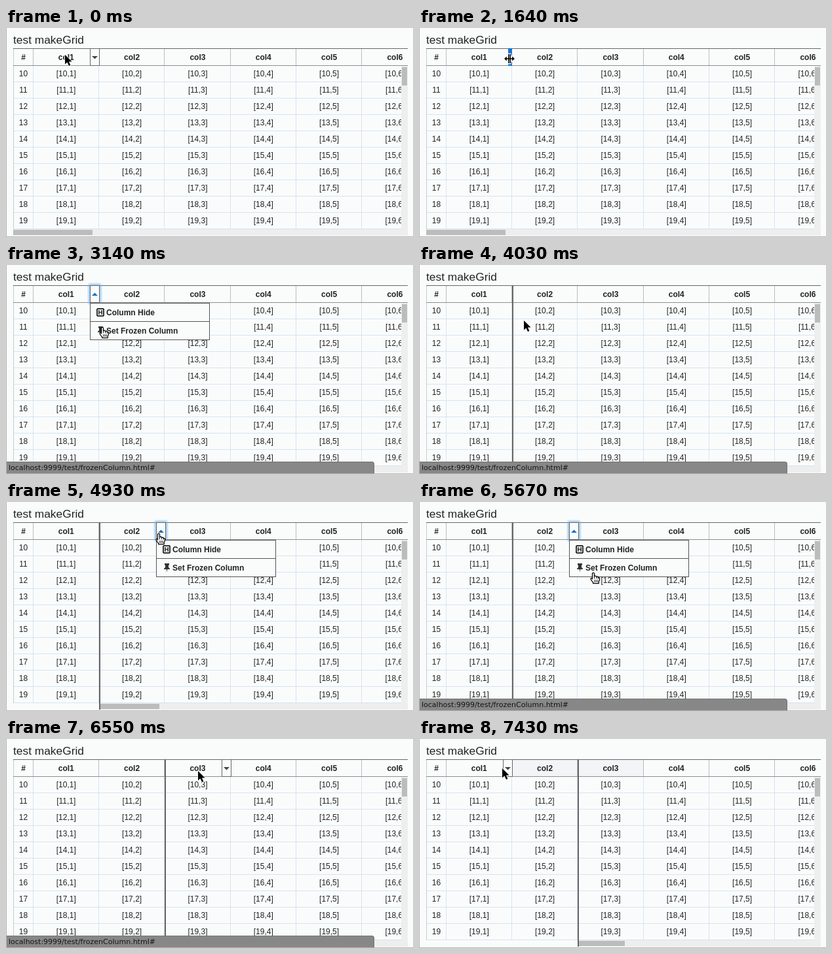
Write an HTML page that moves like this. It is 621 px wide and 320 px high and loops after 8000 ms.

```html
<!DOCTYPE html>
<html lang="en">
<head>
<meta charset="utf-8">
<title>Frozen column grid</title>
<style>
html, body { margin: 0; width: 100%; height: 100%; overflow: hidden; background: #fafcfc; }
svg { display: block; width: 621px; height: 320px; font: 12px "Liberation Sans", Arial, sans-serif; cursor: default; }
rect { shape-rendering: crispEdges; }
text { fill: #222; }
.mid { text-anchor: middle; }
.bold { font-weight: bold; }
.title { font-size: 17.35px; }
.status { font: 11px "DejaVu Sans", sans-serif; fill: #151515; }
</style>
</head>
<body>
<svg id="stage" viewBox="0 0 621 320" xmlns="http://www.w3.org/2000/svg"></svg>
<script>
const LOOP = 8000, BG = '#fafcfc', DARK = '#666';
const stage = document.getElementById('stage');

function add(parent, tag, attrs, text) {
  const el = document.createElementNS('http://www.w3.org/2000/svg', tag);
  for (const k in attrs) el.setAttribute(k, attrs[k]);
  if (text !== undefined) el.textContent = text;
  parent.appendChild(el);
  return el;
}
const group = (parent = stage) => add(parent, 'g', {});
const rect = (p, x, y, width, height, fill) => add(p, 'rect', { x, y, width, height, fill });
const label = (p, x, y, cls, s) => add(p, 'text', { x, y, class: cls }, s);
const path = (p, d, attrs) => add(p, 'path', { d, ...attrs });
const show = (el, on) => { el.style.display = on ? '' : 'none'; };
const move = (el, x, y) => el.setAttribute('transform', `translate(${x} ${y})`);

const edge = k => Math.floor(41.3 + 100.33 * k);
const center = k => 91.8 + 100.33 * (k - 1);

// Page and grid
rect(stage, 0, 0, 621, 320, BG);
rect(stage, 0, 0, 1, 320, '#b4b4b4');
rect(stage, 0, 319, 621, 1, '#b4b4b4');
label(stage, 11, 24, 'title', 'test makeGrid');

const tints = [1, 2, 3].map(k => rect(stage, edge(k - 1) + 1, 32, 100, 25, '#f3f4f6'));
for (let r = 0; r < 10; r++) {
  const y = 58 + 25 * r;
  rect(stage, 11, y + 24, 592, 1, '#d5e4f0');
  label(stage, 26.5, y + 16, 'mid', 10 + r);
  for (let c = 1; c <= 6; c++) label(stage, center(c), y + 16, 'mid', `[${10 + r},${c}]`);
}
rect(stage, 11, 31, 1, 277, '#c3cdd4');
for (let k = 0; k < 6; k++) {
  rect(stage, edge(k), 58, 1, 250, '#d5e4f0');
  rect(stage, edge(k), 32, 1, 25, '#b9bdc0');
}
rect(stage, 11, 31, 602, 1, DARK);
rect(stage, 11, 57, 602, 1, '#8c8f91');
label(stage, 26.5, 49, 'mid bold', '#');
for (let c = 1; c <= 6; c++) label(stage, center(c), 49, 'mid bold', 'col' + c);

// Scrollbars
rect(stage, 603, 58, 10, 260, '#eeeeee');
rect(stage, 604, 60, 8, 28, '#bcbcbc');
const track = rect(stage, 11, 308, 592, 10, '#eeeeee');
const thumb = rect(stage, 11, 309, 121, 8, '#bcbcbc');
const frost = rect(stage, 142, 31, 2, 287, DARK);
const bars = [[11, 121], [143, 91], [244, 70]];

// Resize handle, header button and menu
const handle = rect(stage, 136, 31, 6, 27, '#1674d1');

const button = group();
const glow = group(button);
[[4, .18], [3, .3], [2, .5], [1, .6]].forEach(([d, o]) => add(glow, 'rect', {
  x: .5 - d, y: .5 - d, width: 14 + 2 * d, height: 26 + 2 * d, rx: d,
  fill: 'none', stroke: '#6fb2ec', 'stroke-opacity': o, style: 'shape-rendering:auto'
}));
rect(button, 0, 0, 15, 27, DARK);
rect(button, 1, 1, 13, 25, BG);
const down = path(button, 'M3 12H12L7.5 16.5Z', { fill: '#444' });
const up = path(button, 'M3 16H12L7.5 11.5Z', { fill: '#1470c4' });

const menu = group();
rect(menu, 0, 0, 183, 57, '#555');
rect(menu, 1, 1, 181, 27, BG);
rect(menu, 1, 29, 181, 27, BG);
add(menu, 'rect', { x: 11, y: 9, width: 10, height: 11, rx: 1, fill: 'none', stroke: '#333', 'stroke-width': 1.6 });
path(menu, 'M13.8 11V18M18.2 11V18M13.8 14.5H18.2', { stroke: '#333', 'stroke-width': 1.6, fill: 'none' });
path(menu, 'M13 36H20V38L19 39V42L21 44V45H17.2L16.5 49.5L15.8 45H12V44L14 42V39L13 38Z', { fill: '#333' });
label(menu, 25, 19, 'bold', 'Column Hide');
label(menu, 25, 47, 'bold', 'Set Frozen Column');

// Status bubble
const status = group();
path(status, 'M1 301H558Q562 301 562 305V319H1Z', { fill: '#878787' });
path(status, 'M1 301.5H558Q561.5 301.5 561.5 305V319', { fill: 'none', stroke: '#747474' });
label(status, 4, 314, 'status', 'localhost:9999/test/frozenColumn.html#');

// Pointers, each with its hot spot at 0,0
const line = { 'stroke-linejoin': 'round', 'stroke-linecap': 'round' };
const pointer = { arrow: group(), hand: group(), resize: group() };
path(pointer.arrow, 'M0 0V14.5L3.4 11.4L6 17L8.4 16L6 10.6H10.6Z',
  { ...line, fill: '#000', stroke: '#fff', 'stroke-width': 1.6, 'paint-order': 'stroke' });
path(pointer.hand, 'M-1.5 8V1.6Q-1.5 .3 0 .3Q1.5 .3 1.5 1.6V6Q2 5 3.2 5.2Q4.4 5.4 4.5 6.6Q5.2 5.8 6.3 6.2Q7.3 6.6 7.3 7.7Q8.2 7.2 9 7.8Q9.7 8.4 9.6 9.8Q9.5 12.2 8.2 14V16.7H-.4V15Q-2.4 13.2-3.8 10.5Q-4.4 9-3.2 8.5Q-2.2 8.2-1.5 10Z',
  { ...line, fill: '#fff', stroke: '#000', 'stroke-width': 1.3 });
path(pointer.hand, 'M1.5 6V9M4.5 6.6V9M7.3 7.7V9.5M1.8 11.5V14.5M4 11.5V14.5M6.2 11.5V14.5',
  { ...line, fill: 'none', stroke: '#000', 'stroke-width': .9 });
const cross = 'M-1.2-7V7M1.2-7V7M-6 0H6';
const tips = 'M-8 0L-4.2-3.6V3.6ZM8 0L4.2-3.6V3.6Z';
path(pointer.resize, cross + tips, { ...line, fill: '#fff', stroke: '#fff', 'stroke-width': 3 });
path(pointer.resize, cross, { fill: 'none', stroke: '#000', 'stroke-width': 1.5 });
path(pointer.resize, tips, { fill: '#000' });

// time, pointer, x, y, button column, flags: m menu, s status, r resize handle
const steps = [
  [0, 'arrow', 90, 41, 1, ''],
  [890, 'arrow', 100, 44, 1, ''],
  [1040, 'arrow', 119, 47, 1, ''],
  [1190, 'arrow', 132, 47, 1, ''],
  [1340, 'resize', 138, 47, 1, ''],
  [1640, 'resize', 138, 47, 0, 'r'],
  [2090, 'arrow', 136, 47, 1, ''],
  [2240, 'hand', 134, 48, 1, ''],
  [2540, 'hand', 134, 48, 1, 'm'],
  [2690, 'hand', 135, 53, 1, 'm'],
  [2840, 'hand', 140, 72, 1, 'ms'],
  [2990, 'hand', 144, 88, 1, 'ms'],
  [3140, 'hand', 147, 95, 1, 'ms'],
  [3440, 'arrow', 147, 95, 0, 's'],
  [3890, 'arrow', 160, 85, 0, 's'],
  [4040, 'arrow', 192, 63, 0, 's'],
  [4190, 'arrow', 220, 50, 2, ''],
  [4340, 'hand', 232, 48, 2, ''],
  [4480, 'hand', 233, 48, 2, ''],
  [4930, 'hand', 233, 48, 2, 'm'],
  [5080, 'hand', 235, 53, 2, 'm'],
  [5230, 'hand', 244, 72, 2, 'ms'],
  [5380, 'hand', 256, 93, 2, 'ms'],
  [5520, 'hand', 264, 104, 2, 'ms'],
  [5670, 'hand', 266, 108, 2, 'ms'],
  [5960, 'hand', 266, 108, 0, 's'],
  [6110, 'arrow', 266, 108, 0, 's'],
  [6400, 'arrow', 282, 76, 0, 's'],
  [6550, 'arrow', 293, 49, 3, 's'],
  [6700, 'arrow', 283, 47, 3, 's'],
  [6850, 'arrow', 254, 46, 3, ''],
  [6990, 'arrow', 215, 45, 2, ''],
  [7130, 'arrow', 174, 45, 2, ''],
  [7280, 'arrow', 140, 45, 1, ''],
  [7430, 'arrow', 127, 45, 1, '']
];

function draw(t) {
  const [, kind, x, y, col, flags] = steps.findLast(s => s[0] <= t);
  const open = flags.includes('m');
  const frozen = t < 3440 ? 0 : t < 5960 ? 1 : 2;

  for (const k in pointer) show(pointer[k], k === kind);
  move(pointer[kind], x, y);

  const left = Math.round(28 + 100.33 * col);
  show(button, col > 0);
  move(button, left, 31);
  show(glow, open);
  show(up, open);
  show(down, !open);
  show(menu, open);
  move(menu, left, 58);
  show(handle, flags.includes('r'));
  show(status, flags.includes('s'));

  const [bx, bw] = bars[frozen];
  track.setAttribute('x', bx);
  track.setAttribute('width', 603 - bx);
  thumb.setAttribute('x', bx);
  thumb.setAttribute('width', bw);
  show(frost, frozen > 0);
  frost.setAttribute('x', frozen === 2 ? 242 : 142);

  show(tints[0], false);
  show(tints[1], t >= 7280);
  show(tints[2], t >= 6990);
}

const start = performance.now();
function tick(now) {
  draw(Math.max(0, now - start) % LOOP);
  requestAnimationFrame(tick);
}
draw(0);
requestAnimationFrame(tick);
</script>
</body>
</html>
```
